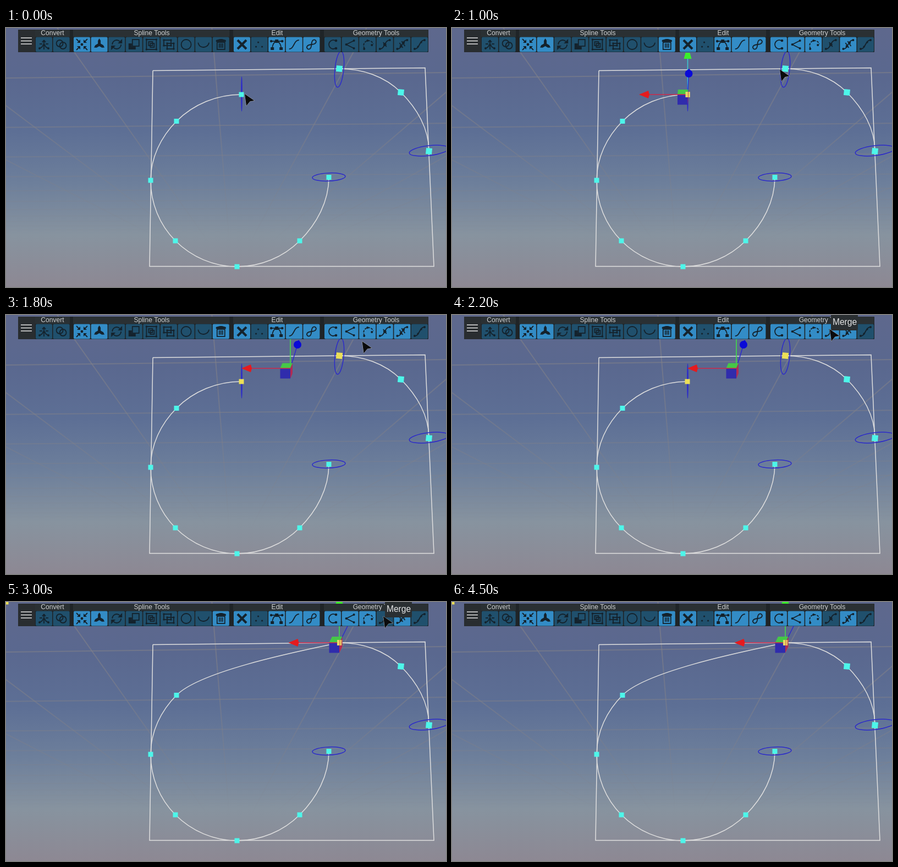
An HTML page with a canvas that plays this animation: 800x471 px, repeating every 5 s.

```html
<!DOCTYPE html>
<html lang="en">
<head>
<meta charset="utf-8">
<title>Spline merge</title>
<style>
html, body { margin: 0; width: 100%; height: 100%; overflow: hidden; background: #5d688d; }
canvas { display: block; width: 800px; height: 471px; }
</style>
</head>
<body>
<canvas id="stage" width="800" height="471"></canvas>
<script>
const g = document.getElementById('stage').getContext('2d');
const { PI, cos, sin, hypot, floor } = Math;
const LOOP = 5000, STEP = 100;
const SELECT_A = 200, SELECT_B = 1300, MERGE = 2600, TIP_ON = 2000, TIP_OFF = 4000;
const CYAN = '#4df6ea', YELLOW = '#ecdf57', RING = '#2c2bc9', LINE = '#dedede', INK = '#14222c';

// ---- helpers ----
function trace(p) {
  g.beginPath();
  for (let i = 0; i < p.length; i += 2) g.lineTo(p[i], p[i + 1]);
}

function seg(...p) { trace(p); g.stroke(); }
function shape(...p) { trace(p); g.closePath(); g.fill(); }

function pen(color, width) {
  g.strokeStyle = g.fillStyle = color;
  g.lineWidth = width;
}

function at(x, y, angle, paint) {
  g.save();
  g.translate(x, y);
  g.rotate(angle);
  paint();
  g.restore();
}

function spin(n, paint) {
  for (let i = 0; i < n; i++) at(0, 0, i * 2 * PI / n, paint);
}

function mirror(paint) {
  paint();
  g.save();
  g.scale(-1, 1);
  paint();
  g.restore();
}

function arc(x, y, r, from = 0, to = 2 * PI) {
  g.beginPath();
  g.arc(x, y, r, from, to);
  g.stroke();
}

function dot(x, y, r = 2) {
  g.beginPath();
  g.arc(x, y, r, 0, 2 * PI);
  g.fill();
}

function bezier(...p) {
  g.beginPath();
  g.moveTo(p[0], p[1]);
  g.bezierCurveTo(...p.slice(2));
  g.stroke();
}

function box(x, y, w, h, color, r = 0) {
  g.fillStyle = color;
  g.beginPath();
  g.roundRect(x, y, w, h, r);
  g.fill();
}

function label(text, x, y, size, color) {
  g.font = size + 'px "Liberation Sans", Arial, sans-serif';
  g.textAlign = 'center';
  g.fillStyle = color;
  g.fillText(text, x, y);
}

function shade(height, colors) {
  const s = g.createLinearGradient(0, 0, 0, height);
  colors.forEach((c, i) => s.addColorStop(i / (colors.length - 1), c));
  return s;
}

// ---- floor grid in perspective ----
const sky = shade(471, ['#5e688d', '#5a688f', '#5d6f95', '#6d7f9b', '#87939f', '#8d8893']);
const fade = shade(390, ['rgba(128,128,136,.68)', 'rgba(128,128,136,.5)', 'rgba(128,128,136,0)']);
const HORIZON = 450;

function backdrop() {
  g.fillStyle = sky;
  g.fillRect(0, 0, 800, 471);
  pen(fade, 2);
  for (let k = -3; k <= 4; k++) {
    const x = 378 + 253 * k;
    seg(x, 45, 411, HORIZON);
    seg(x, 45, x - (411 - x) / 9, 0);
  }
  for (let n = 3; n < 14; n++) seg(0, HORIZON - 1077 / n, 800, HORIZON - 1107 / n);
}

// ---- splines: knots turn by an eighth each ----
const turn = (points, start, step) => points.map(([x, y], i) => ({ x, y, dir: start + i * step }));
const loopKnots = turn([[428, 121], [310, 169.5], [263, 277], [308, 387], [420, 434], [534, 387], [587, 271.5]], PI, -PI / 4);
const arcKnots = turn([[606, 74], [718, 117], [769, 224]], 0, PI / 4);

function curve(knots) {
  for (let i = 1; i < knots.length; i++) {
    const a = knots[i - 1], b = knots[i], h = .346 * hypot(b.x - a.x, b.y - a.y);
    bezier(a.x, a.y, a.x + h * cos(a.dir), a.y + h * sin(a.dir),
      b.x - h * cos(b.dir), b.y - h * sin(b.dir), b.x, b.y);
  }
}

function splines(merged) {
  pen(LINE, 1.5);
  seg(267, 77.5, 762, 72.5, 778, 433.5, 261, 433.5, 267, 77.5);
  curve(merged ? loopKnots.slice(1) : loopKnots);
  if (merged) bezier(606, 74, 561, 84, 357, 122, 310, 169.5);
  curve(arcKnots);
}

function ring(x, y, rx, ry, tilt) {
  pen(RING, 1.5);
  g.beginPath();
  g.ellipse(x, y, rx, ry, tilt, 0, 2 * PI);
  g.stroke();
}

function cubes(knots, size, tilt, firstColor) {
  knots.forEach((k, i) => at(k.x, k.y, tilt, () =>
    box(-size / 2, -size / 2, size, size, i ? CYAN : firstColor)));
}

// ---- move handle; (kx, ky) is the skew of the depth planes, (bx, by) the depth axis ----
function cone(x, y, angle, color) {
  g.fillStyle = color;
  at(x, y, angle, () => shape(0, -8, 7, 9, 0, 11, -7, 9));
}

function gizmo(x, y, kx, ky, bx, by, reach, up, upColor) {
  const s = 18.5;
  pen(upColor, 1.6);
  seg(x, y, x, y - up);
  pen('#3bf02c');
  shape(x - 7, y - up + 5, x - 4, y - up - 6, x + 4, y - up - 6, x + 7, y - up + 5);
  pen('#2c2ccc', 1.5);
  seg(x, y, x + bx, y + by);
  pen('#0a0ad8');
  dot(x + bx, y + by, 7);
  at(x + bx, y + by, Math.atan2(bx, -by), () => shape(-6, -3, 0, -9, 6, -3));
  pen('#45c847');
  shape(x - s, y, x - s + kx, y + ky, x + kx, y + ky, x, y);
  pen('#302cac');
  shape(x - s, y, x, y, x, y + s, x - s, y + s);
  pen('#b02c54');
  shape(x, y, x + kx, y + ky, x + kx, y + s + ky, x, y + s);
  pen('#cf2748', 1.4);
  seg(x, y, x - reach + 17, y);
  cone(x - reach + 8, y, -PI / 2, '#e51b1e');
}

function activeCube(x, y) {
  box(x - 4, y - 5, 8, 10, '#e8d867');
  pen('#c84a48', 1);
  seg(x + 1, y - 5, x + 1, y + 5);
}

// ---- toolbar icons, drawn around their centre ----
const corners = (x, y, w, h) => {
  g.strokeRect(x, y, w, h);
  for (let i = 0; i < 4; i++) dot(x + w * (i % 2), y + h * (i >> 1), 1.7);
};
const sCurve = () => bezier(-9, 8, 0, 9, -1, -8, 9, -8);
const beads = (gap, r) => {
  sCurve();
  mirror(() => {});
  spin(2, () => { dot(9, -8); dot(gap, -gap * 1.3, r); });
};

const icons = {
  branch() {
    seg(0, 9, 0, -8);
    mirror(() => { seg(0, -8, 3, -4); seg(0, -1, 4, 5, 8, 7); seg(3, -1, 8, -1); dot(8, 7); });
  },
  rings() { spin(2, () => arc(3, 2, 6)); },
  center() {
    dot(0, 0, 2.4);
    spin(4, () => { seg(10, 10, 5, 5); shape(3, 3, 9, 3, 3, 9); });
  },
  axes() { spin(3, () => shape(-2.5, 0, -2.5, -7, 0, -11, 2.5, -7, 2.5, 0)); },
  cycle() { spin(2, () => { arc(0, 0, 8, PI, PI * 1.75); shape(10, -10, 10, -2, 2, -2); }); },
  copy() { g.strokeRect(-3, -9, 12, 12); shape(-10, -2, -4, -2, -4, 4, 3, 4, 3, 9, -10, 9); },
  group() { corners(-9, -9, 18, 18); g.strokeRect(-5, -5, 7, 7); g.strokeRect(-2, -2, 7, 7); },
  ungroup() { corners(-9, -8, 13, 10); corners(-3, -2, 12, 10); },
  circle() { arc(0, 0, 9); },
  arc() { arc(0, -5, 10, .05 * PI, .95 * PI); },
  trash() {
    g.strokeRect(-7, -4, 14, 13);
    shape(-9, -8, -2, -10, 2, -10, 9, -8, 9, -5, -9, -5);
    for (const x of [-3, 0, 3]) seg(x, -2, x, 6);
  },
  cross() { g.lineWidth = 4.2; spin(4, () => seg(0, 0, 8, 8)); },
  dots() { dot(-2, -4, 1.6); dot(-6, 4, 1.6); dot(5, 4, 1.6); },
  bezier() {
    g.fillRect(-3, -9, 6, 6);
    mirror(() => { seg(0, -6, 10, -6); dot(10, -6, 2.3); bezier(0, -6, 5, -5, 8, 1, 8, 7); g.fillRect(5, 5, 6, 5); });
  },
  wave: sCurve,
  eight() { at(0, 0, -.8, () => mirror(() => bezier(0, 0, 14, -12, 14, 12, 0, 0))); },
  hook() { arc(1, 0, 8, .32 * PI, 1.68 * PI); dot(6, -7, 2.3); dot(6, 7, 2.3); },
  angle() { seg(7, -7, -7, 0, 7, 7); dot(7, -7); dot(-7, 0); dot(7, 7); },
  steps() {
    g.setLineDash([4, 2]);
    arc(2, 2, 9, .8 * PI, 1.9 * PI);
    dot(-6, 8); dot(0, -7); dot(8, 1);
  },
  join() { beads(0, 2.6); seg(-3, -4, 3, 4); },
  split() { beads(2.5, 2.2); spin(2, () => seg(-1, -6, 5, 3)); },
  link() { beads(3, 1.7); }
};

const groups = [
  ['Convert', 54, 84.5, 'branch rings'],
  ['Spline Tools', 123, 265, 'center axes cycle copy group ungroup circle arc trash'],
  ['Edit', 414, 493, 'cross dots bezier wave eight'],
  ['Geometry Tools', 579, 673, 'hook angle steps join split link']
];

function toolbar(t) {
  let on = 'center axes cross bezier wave eight';
  if (t >= SELECT_A) on += ' trash hook angle steps split';
  if (t >= SELECT_B && t < MERGE) on += ' join';
  const active = new Set(on.split(' '));

  box(22, 3, 746, 41, '#1f2427', 1);
  box(22, 3, 31, 41, '#292d30', 1);
  pen('#d8d8d8', 1.6);
  for (let y = 18; y < 30; y += 5.5) seg(27, y, 47, y);
  for (const [title, left, mid, list] of groups) {
    const names = list.split(' ');
    box(left - 1, 3, names.length * 31.6, 13, '#2a3033');
    label(title, mid, 13, 12.1, '#cfd1d2');
    names.forEach((name, i) => {
      const x = left + i * 31.6;
      box(x, 16.5, 30, 27, active.has(name) ? '#338cc6' : '#20506d', 2);
      pen(INK, 1.8);
      at(x + 15, 30, 0, icons[name]);
    });
  }
}

// ---- pointer stops: time, x, y ----
const stops = [
  [100, 434, 120], [500, 536, 103], [1100, 608, 70], [1500, 608, 70],
  [2100, 687, 26], [3800, 685, 26], [4200, 640, -30]
];

function pointer(t) {
  const i = stops.findIndex(s => s[0] > t);
  const b = stops[i < 0 ? stops.length - 1 : i], a = i > 0 ? stops[i - 1] : b;
  const p = a === b ? 0 : (t - a[0]) / (b[0] - a[0]);
  at(a[1] + (b[1] - a[1]) * p, a[2] + (b[2] - a[2]) * p, 0, () => {
    trace([0, 0, 17.5, 12, 9.5, 13.5, 3, 21.5]);
    g.closePath();
    pen('#b9bcc2', 1);
    g.stroke();
    g.fillStyle = '#0b0b0c';
    g.fill();
  });
}

function draw(t) {
  const merged = t >= MERGE, second = t >= SELECT_B, first = t >= SELECT_A;
  backdrop();
  splines(merged);
  ring(769, 223, 36, 9, -.12);
  ring(587, 271, 30, 7.3, -.04);
  if (!merged) {
    ring(606, 75, 8, 33, .1);
    ring(428.5, 120, .6, 31, 0);
  }
  cubes(merged ? [{}, ...loopKnots.slice(1)] : loopKnots, 9, 0, first ? YELLOW : CYAN);
  cubes(arcKnots, 11, .1, second ? YELLOW : CYAN);

  if (merged) {
    gizmo(606, 74, 5.5, -11, 27, -54, 92.5, 74, '#41dd4a');
    activeCube(606, 74);
  } else if (second) {
    gizmo(517, 97, 4, -9.5, 13, -43, 89, 72, '#41dd4a');
  } else if (first) {
    gizmo(428.5, 121, 1, -9, 2, -38, 88.5, 70, '#3cc9d2');
    activeCube(428.5, 121);
  }

  toolbar(t);
  if (t >= TIP_ON && t < TIP_OFF) {
    box(689, -3, 49, 31, '#2a2f32', 2);
    label('Merge', 714, 17.5, 15.6, '#e4e5e6');
  }
  pointer(t);
}

function tick(now) {
  draw(floor(now % LOOP / STEP) * STEP);
  requestAnimationFrame(tick);
}
draw(0);
requestAnimationFrame(tick);
</script>
</body>
</html>
```
